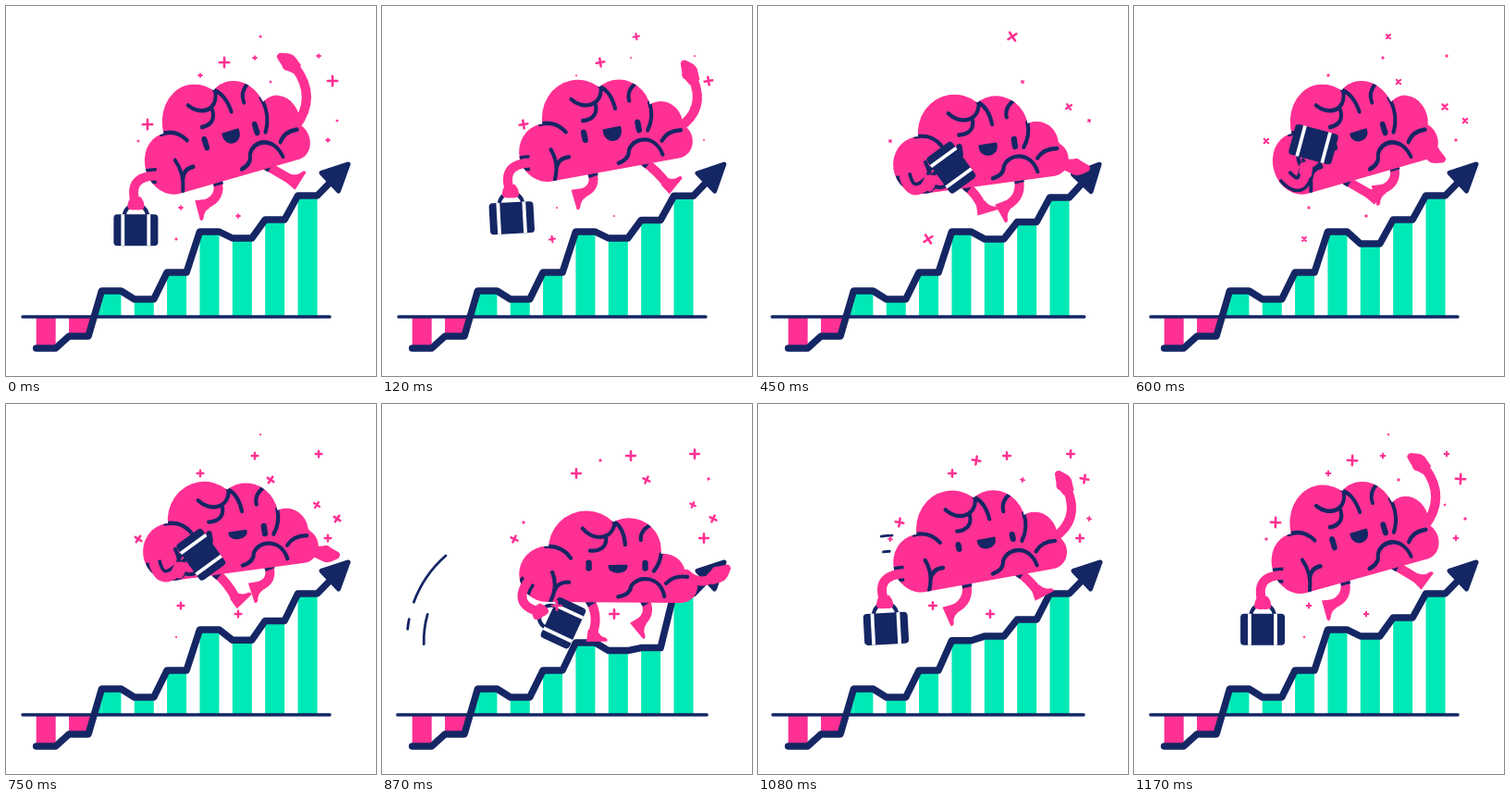
Write an HTML page with a canvas that moves like this. It is 400x400 px and loops after 1.2 s.

```html
<!DOCTYPE html>
<html lang="en">
<head>
<meta charset="utf-8">
<title>Brain running up a growth chart</title>
<style>
  html, body { margin: 0; width: 100%; height: 100%; overflow: hidden; background: #fff; }
  canvas { display: block; width: 400px; height: 400px; }
</style>
</head>
<body>
<canvas id="stage"></canvas>
<script>
const LOOP = 1200, STRIDE = LOOP / 2, STEP = 30;
const PINK = '#ff3093', NAVY = '#152664', GREEN = '#00e8b5', WHITE = '#fff';
const RAD = Math.PI / 180, TAU = 2 * Math.PI;

const canvas = document.getElementById('stage');
const ctx = canvas.getContext('2d');
const dpr = window.devicePixelRatio || 1;
canvas.width = canvas.height = 400 * dpr;

// Periodic 0..1 swell that is 1 at the peak; sharper with a higher power.
const wave = (t, peak, power = 1, period = LOOP) =>
  ((1 + Math.cos((t - peak) / period * TAU)) / 2) ** power;

// Single smooth bump, zero beyond 200 ms from its peak.
const bump = (t, peak) => {
  const d = Math.abs(t - peak) / 200;
  return d < 1 ? (1 + Math.cos(Math.PI * d)) / 2 : 0;
};

const mix = (a, b, u) => a + (b - a) * u;
const clamp01 = u => Math.min(1, Math.max(0, u));

function at(x, y, angle, draw) {
  ctx.save();
  ctx.translate(x, y);
  ctx.rotate(angle * RAD);
  draw();
  ctx.restore();
}

function stroke(path, color, width, cap = 'round') {
  ctx.strokeStyle = color;
  ctx.lineWidth = width;
  ctx.lineCap = cap;
  ctx.lineJoin = 'round';
  ctx.stroke(path);
}

function fill(path, color) {
  ctx.fillStyle = color;
  ctx.fill(path);
}

function poly(points, close) {
  const p = new Path2D();
  points.forEach(([x, y]) => p.lineTo(x, y));
  if (close) p.closePath();
  return p;
}

// Chart

const restTops = [370, 357, 308, 317, 288, 244, 251, 231, 205];
// column, time, depth of each push by a foot
const pushes = [[7, 300, 17], [8, 300, 14], [6, 600, 6], [5, 970, 28], [6, 890, 16], [7, 910, 36]];

function drawChart(t) {
  const tops = restTops.slice();
  for (const [col, time, depth] of pushes) tops[col] += depth * bump(t, time);

  const line = [];
  tops.forEach((y, i) => {
    const x = 32.7 + 35.35 * i;
    ctx.fillStyle = i < 2 ? PINK : GREEN;
    ctx.fillRect(x, 336, 21, y - 336);
    line.push([x, y], [x + 21, y]);
  });
  fill(poly([[89, 336], [95, 336], [89, 357]], true), PINK);
  fill(poly([[95, 336], [103.5, 308], [103.5, 336]], true), GREEN);

  const reach = 3.5 * bump(t % STRIDE, 390);
  stroke(poly([[18 - reach, 336], [350 + reach, 336]]), NAVY, 3.4);

  const tilt = bump(t, 300);
  const hx = 355 - tilt, hy = 186 + 6 * tilt;
  stroke(poly([...line, [hx, hy]]), NAVY, 7.5);
  at(hx, hy, -20 * tilt, () => {
    const head = poly([[15, -15], [-14, -5.5], [4.5, 14]], true);
    fill(head, NAVY);
    stroke(head, NAVY, 5);
  });
}

// Wind: radius, start, end, delay (angles in degrees)

const windLines = [
  [114, 186, 191, 0], [114, 200, 268, 0],
  [97, 178, 242, 33], [97, 249, 266, 33],
  [79, 198, 245, 50]
];

function drawWind(t) {
  if (t < 800 || t > 1090) return;
  const head = 180 + (t - 800) * .7;
  const tail = 170 + Math.max(0, t - 1000) * 1.15;
  const grow = 1 + .07 * clamp01((990 - t) / 120);
  for (const [r, a, b, delay] of windLines) {
    const from = Math.max(a, tail), to = Math.min(b, head - delay);
    if (to <= from) continue;
    const arc = new Path2D();
    arc.arc(149, 256, r * grow, from * RAD, to * RAD);
    stroke(arc, NAVY, 2.8);
  }
}

// Brain

const folds = new Path2D(
  'M-64 -17 Q-46 -18 -37 -4' +
  'M-57 11 Q-51 26 -59 42 M-55 31 Q-51 21 -39 22' +
  'M-24 -36 C-14 -23 8 -22 11 -42 M1 -28 C3 -17 -4 -11 -16 -12' +
  'M10 -43 Q21 -36 22 -18' +
  'M39 -23 Q38 -33 49 -39' +
  'M66 24 Q74 15 89 17' +
  'M14 38 Q27 36 28 27 C36 14 60 16 64 38');

// Upright and tall at the top of each stride, flat and wide on landing.
function brainPose(t) {
  const phase = t / STRIDE * TAU;
  const flat = wave(t, 300, 1, STRIDE);
  const squash = Math.sqrt(flat);
  const x = 230 + 11 * flat + Math.sin(phase);
  const y = 139.5 - 7 * Math.sin(phase) + 20.5 * bump(t, 300) + 35 * bump(t, 900);
  const matrix = new DOMMatrix()
    .translate(x, y)
    .rotate(17 * (flat - 1))
    .scale(mix(.93, 1, squash), mix(1.12, 1, squash));
  return { matrix, flat };
}

function brainShape(lobeX, lobeY) {
  const p = poly([[-63, 13], [-20, -14], [26, -12], [lobeX, lobeY], [82, 45], [-63, 43]], true);
  const lobes = [[-63, 13, 30], [-20, -14, 41], [26, -12, 35], [lobeX, lobeY, 24], [82, 27, 18]];
  for (const [x, y, r] of lobes) {
    const c = new Path2D();
    c.arc(x, y, r, 0, TAU);
    p.addPath(c);
  }
  return p;
}

function drawFace(t, flat) {
  const eye = (14 - 6 * bump(t, 990)) / 2 - 3.2;
  for (const [x, y] of [[-17.5, 4], [43.5, 4.5]]) {
    stroke(poly([[x, y - eye], [x, y + eye + .1]]), NAVY, 6.4);
  }
  const top = 4.5 * flat;
  const bottom = top + 1.25 * mix(7.5, 13.5, wave(t, 220));
  const lips = new Path2D(`M4.5 ${top} L23.5 ${top} C25 ${bottom} 3 ${bottom} 4.5 ${top} Z`);
  fill(lips, NAVY);
  stroke(lips, NAVY, 1.6);
}

function drawBrain(t, { matrix, flat }) {
  const lobeX = 72 - 9 * flat, lobeY = 3 + 13 * flat;
  const shape = brainShape(lobeX, lobeY);
  ctx.save();
  ctx.transform(matrix.a, matrix.b, matrix.c, matrix.d, matrix.e, matrix.f);
  fill(shape, PINK);
  ctx.save();
  ctx.clip(shape);
  stroke(folds, NAVY, 4.2);
  const crease = new Path2D();
  crease.arc(26, -12, 35, (25 * flat - 17) * RAD, 40 * RAD);
  stroke(crease, NAVY, 4.2);
  ctx.restore();
  drawFace(t, flat);
  ctx.restore();
  const placed = new Path2D();
  placed.addPath(shape, matrix);
  return placed;
}

// Limbs: a joint on the brain, an angle from straight down, a reach and a bend sideways.

const handShape = new Path2D(
  'M-6 3 L-8 -4 Q-11 -8 -8 -12 L-5 -22 Q-3 -25 1 -23 L5 -18 Q10 -12 8 -6 L6 3 Z');
const footShape = new Path2D('M-5 -4 L5 -4 Q7 3 14 5 Q17 7 15 9 L-7 9 Z');
const fistShape = new Path2D('M-5 -8 L5 -8 Q10 -2 9 4 Q7 7 0 6 Q-8 7 -9 3 Q-9 -3 -5 -8 Z');

function limb({ matrix }, jointX, jointY, angle, reach, bend) {
  const a = matrix.transformPoint(new DOMPoint(jointX, jointY));
  const sin = Math.sin(angle * RAD), cos = Math.cos(angle * RAD);
  const x = a.x + sin * reach, y = a.y + cos * reach;
  const kx = (a.x + x) / 2 + cos * bend, ky = (a.y + y) / 2 - sin * bend;
  const path = new Path2D(`M${a.x} ${a.y} Q${kx} ${ky} ${x} ${y}`);
  const d = 6 / Math.hypot(kx - a.x, ky - a.y);
  const cuff = poly([[a.x, a.y], [mix(a.x, kx, d), mix(a.y, ky, d)]]);
  return { path, cuff, x, y };
}

// Both legs follow one cycle, half a loop apart.
function drawLeg(t, pose, jointX) {
  const forward = wave(t, 0, 1.8);
  const reach = 25.5 + 11 * wave(t, 260);
  const leg = limb(pose, jointX, 41, mix(-27, 60, forward), reach, 14 * (1 - forward));
  stroke(leg.path, PINK, 10);
  at(leg.x, leg.y, mix(75, -60, wave(t, 40, 1.5)), () => fill(footShape, PINK));
  stroke(leg.cuff, NAVY, 10.5, 'butt');
}

function drawFreeArm(t, pose) {
  const down = wave(t, 600);
  const reach = mix(25, 64, wave(t, 0, 3));
  const arm = limb(pose, 88, 14, 180 - 173 * down, reach, 24 * (down - 1));
  stroke(arm.path, PINK, 10);
  at(arm.x, arm.y, mix(-49, 125, down ** .85), () => fill(handShape, PINK));
}

function drawBag() {
  stroke(new Path2D('M-13 13 Q-11 1 0 1 Q11 1 13 13'), NAVY, 4);
  const box = new Path2D();
  box.roundRect(-24, 11, 48, 34, 4);
  fill(box, NAVY);
  ctx.fillStyle = WHITE;
  for (const x of [-16, 12]) ctx.fillRect(x, 11, 3.8, 34);
}

function drawBagArm(t, pose, outline) {
  const swing = wave(t, 600, 1.7);
  const arm = limb(pose, -83, 20, mix(-36, 106, swing), 38 - 13 * swing ** 2, -26);
  const tilt = -165 * swing;
  at(arm.x, arm.y, tilt, drawBag);
  // The arm is outlined only where it crosses the brain.
  ctx.save();
  ctx.clip(outline);
  stroke(arm.path, NAVY, 17, 'butt');
  ctx.restore();
  stroke(arm.path, PINK, 10);
  at(arm.x, arm.y, tilt / 2, () => fill(fistShape, PINK));
}

// Sparkles: peak time, largest size, sharpness, turns, places

const sparkles = [
  [350, 6, 1.7, true, [[275, 33], [184, 252]]],
  [0, 5.2, 1.7, true, [[236, 61], [353, 81], [153, 128]]],
  [930, 5, 1.7, false, [[269, 56], [210, 75], [338, 54], [348, 145], [189, 218], [251, 227]]],
  [790, 4, 1, true, [[286, 82], [143, 146], [358, 124]]],
  [600, 3.6, .3, true, [[336, 109]]]
];

function drawSparkles(t) {
  for (const [peak, max, sharp, turns, places] of sparkles) {
    const r = max * wave(t, peak, sharp);
    if (r < .4) continue;
    const cross = new Path2D(`M${-r} 0 H${r} M0 ${-r} V${r}`);
    for (const [x, y] of places) {
      at(x, y, turns ? -90 * t / LOOP : 0, () => stroke(cross, PINK, Math.min(2.6, 1 + r * .4)));
    }
  }
}

function draw(t) {
  ctx.setTransform(dpr, 0, 0, dpr, 0, 0);
  ctx.fillStyle = WHITE;
  ctx.fillRect(0, 0, 400, 400);
  const pose = brainPose(t);
  drawChart(t);
  drawWind(t);
  drawLeg(t, pose, 42);
  drawLeg(t + STRIDE, pose, -17);
  drawFreeArm(t, pose);
  const outline = drawBrain(t, pose);
  drawBagArm(t, pose, outline);
  drawSparkles(t);
}

let start;
function tick(now) {
  start ??= now;
  draw(Math.floor(Math.max(0, now - start) % LOOP / STEP) * STEP);
  requestAnimationFrame(tick);
}
draw(0);
requestAnimationFrame(tick);
</script>
</body>
</html>
```
